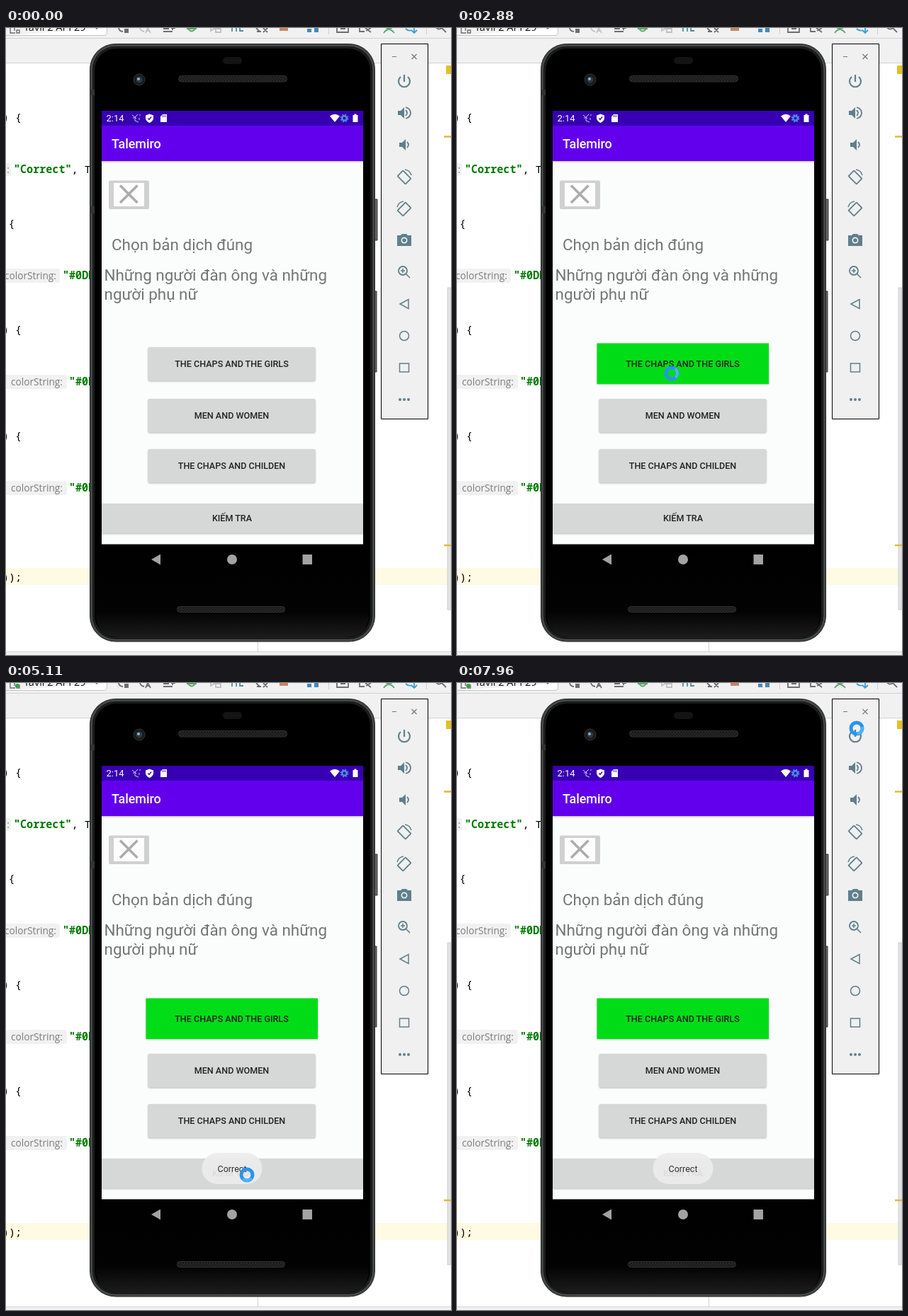
Recreate the animation shown at these times as an HTML page. Size 628x886 px, loop 8 s.

```html
<!DOCTYPE html>
<html lang="en">
<head>
<meta charset="utf-8">
<style>
html, body { margin: 0; width: 100%; height: 100%; overflow: hidden; background: #fff; }
svg { display: block; width: 628px; height: 886px; }
text { white-space: pre; }
.code { font: 15.1px "Noto Sans Mono", "DejaVu Sans Mono", monospace; }
.str { font-weight: 700; fill: #007a00; }
.hint { font: 13.7px "Open Sans", "Noto Sans", sans-serif; fill: #7d7d7d; text-anchor: end; }
.app { font-family: Roboto, sans-serif; }
.big { font-size: 22.44px; fill: #757575; }
.label { font-size: 12.57px; font-weight: 500; fill: #222; text-anchor: middle; }
.btn { fill: #d6d7d7; filter: drop-shadow(0 1px 1px #0004); }
.line { fill: none; stroke: #5f7f8c; stroke-width: 1.8; }
.solid { fill: #5f7f8c; stroke: none; }
</style>
</head>
<body>
<svg viewBox="0 0 628 886">
  <defs>
    <linearGradient id="chin" x2="0" y2="1">
      <stop offset="0" stop-color="#000"/><stop offset=".7" stop-color="#030303"/><stop offset="1" stop-color="#1c1c1c"/>
    </linearGradient>
    <linearGradient id="drop" x2="0" y2="1">
      <stop offset="0" stop-color="#000" stop-opacity=".2"/><stop offset="1" stop-color="#000" stop-opacity="0"/>
    </linearGradient>
    <pattern id="mesh" width="4" height="4" patternUnits="userSpaceOnUse">
      <path d="M0 4L4 0M0 0L4 4" stroke="#2c2c2c" stroke-width=".8"/>
    </pattern>
    <clipPath id="checkClip"><rect x="135" y="672" width="369" height="42"/></clipPath>
    <clipPath id="firstClip"><rect x="200.500" y="451" width="236" height="47.500" rx="2"/></clipPath>
    <clipPath id="screenClip"><rect x="135" y="117" width="369" height="612.500"/></clipPath>
  </defs>

  <!-- editor window -->
  <path d="M0 0H628V49H0zM0 882H628V886H0z" fill="#f1f1f1"/>
  <path d="M0 14.5H628M0 49.5H628M0 881.5H628M355.5 867V881" stroke="#d2d2d2"/>
  <path d="M0 763H628V787H0z" fill="#fffae3"/>
  <path d="M623 367H628V822H623z" fill="#e2e2e2" stroke="#cfcfcf"/>
  <path d="M621 53H628V65H621z" fill="#e5bf26"/>
  <path d="M618 153.5H628M618 731H628" stroke="#e3b93a" stroke-width="2.5"/>

  <g id="toolbar" fill="none" stroke="#6e6e6e" stroke-width="1.8">
    <path d="M0 10.5H138Q142.500 10.500 142.500 6V0" fill="#fff" stroke="#c4c4c4" stroke-width="1"/>
    <path d="M6 0V7H13M12 0V4M15 3H19V7H15z" stroke-width="1.4"/>
    <text x="25" y="4" font-family="Open Sans, sans-serif" font-size="14.5" fill="#111" stroke="none">Tavil 2 API 29</text>
    <path d="M125 -2L128 1L131 -2" stroke-width="1.4"/>
    <path d="M159 0Q160 5 165 5"/>
    <path d="M167 1H173V7H167z" fill="#6e6e6e" stroke="none"/>
    <path id="apply" d="M189 0Q190 4 195 5M197 7L200 0L204 7M198 4H203" stroke="#c3c3c3"/>
    <path d="M222 1H230M222 5H235M233 0H239M235 -2V3"/>
    <path d="M255 1H269M257 -2V1Q262 8 267 1V-2" stroke="#59a869"/>
    <path d="M289 -2V4L295 0M296 1H303V6H296z" stroke="#c0c0c0"/>
    <path d="M319 0V5M325 -2V5M330 -1V4H335" stroke="#4f8f9f"/>
    <path d="M353 0L358 5M363 0L369 6M369 0L363 6M354 5H360"/>
    <path d="M386 -2H398V4H386z" fill="#c98560" stroke="none"/>
    <path d="M425 1H431V6H425zM435 0H441V6H435z" fill="#4588b8" stroke="none"/>
    <path d="M455.500 0V9M593.500 0V9" stroke="#cfcfcf" stroke-width="1"/>
    <path d="M467 -2V6H483V-2M472 1H479"/>
    <path d="M499 0V5H506M507 0L515 6M515 0L508 4"/>
    <path d="M533 7Q540 -3 548 7M536 0H545" stroke="#59a869"/>
    <path d="M564 1Q568 5 573 3M576 -1V6M572 3L576 7L580 3" stroke="#389fd6"/>
    <path d="M606 -2Q610 4 615 0L621 6"/>
    <circle id="live" cx="16" cy="4" r="3" fill="#36a347" stroke="none"/>
  </g>

  <g class="code">
    <text x="-5" y="130.500">) {</text>
    <text x="3.500" y="280.500">{</text>
    <text x="-5" y="430.500">) {</text>
    <text x="-5" y="580.500">) {</text>
    <text x="-5" y="780.500">));</text>
    <text x="11" y="205"><tspan class="str">"Correct"</tspan>, T</text>
    <text class="str" x="80" y="355">"#0DD</text>
    <text class="str" x="89" y="505">"#0DD</text>
    <text class="str" x="89" y="655">"#0DD</text>
  </g>
  <path d="M0 191H3Q7 191 7 195V205Q7 209 3 209H0zM0 340H72Q76 340 76 344V356Q76 360 72 360H0zM0 490H82Q86 490 86 494V506Q86 510 82 510H0zM0 640H82Q86 640 86 644V656Q86 660 82 660H0z" fill="#f1f1f1"/>
  <g class="hint">
    <text x="5" y="205">:</text>
    <text x="71" y="355">colorString:</text>
    <text x="80" y="505">colorString:</text>
    <text x="80" y="655">colorString:</text>
  </g>

  <!-- phone body -->
  <path d="M517 242H524V300H517zM517 372H523V486H517z" fill="#6a6a6a" stroke="#333"/>
  <rect x="118.500" y="22.500" width="402" height="844.500" rx="36" fill="#3e4041" stroke="#2a2b2b"/>
  <rect x="121" y="25" width="397" height="839.500" rx="34" fill="#1b1c1c" stroke="#5a5c5c"/>
  <rect x="125" y="29" width="389" height="832" rx="31" fill="#000"/>
  <path d="M127 740H512V828Q512 861 479 861H160Q127 861 127 828z" fill="url(#chin)"/>
  <path d="M118 87H125V95H118zM118 252H125V262H118z" fill="#333"/>
  <rect x="306" y="41" width="27" height="10" rx="5" fill="#141414"/>
  <g fill="#1a1a1a" stroke="#333">
    <circle cx="188" cy="73" r="8"/>
    <rect x="243.500" y="67.500" width="153" height="8.500" rx="4"/>
    <rect x="241.500" y="817.500" width="152" height="8" rx="4"/>
  </g>
  <rect x="245" y="69" width="150" height="6" fill="url(#mesh)"/>
  <rect x="243" y="819" width="149" height="5" fill="url(#mesh)"/>
  <circle cx="188" cy="73" r="4.500" fill="#28394a"/>
  <circle cx="187" cy="72" r="2" fill="#8fb2c9"/>
  <g fill="#a3a3a3">
    <path d="M205 751L218 743.500V758.500z"/>
    <circle cx="319" cy="751" r="7"/>
    <path d="M418.500 744H432V758H418.500z"/>
  </g>

  <!-- app screen -->
  <g class="app" clip-path="url(#screenClip)">
    <path d="M135 117H504V730H135z" fill="#fbfdfd"/>
    <path d="M135 117H504V138H135z" fill="#3700b3"/>
    <path d="M135 138H504V188H135z" fill="#6200ee"/>
    <path d="M135 188H504V191H135z" fill="url(#drop)"/>
    <g fill="#fff">
      <text x="141.500" y="132" font-size="13">2:14</text>
      <path d="M178 123L184 128M186 122L182 126V131L187 133M188 127V130M179 127H181M189 122V124" fill="none" stroke="#d5c8f2" stroke-width="1"/>
      <path d="M197 123.500L202.500 121.500L208 123.500V128Q207 132 202.500 134Q198 132 197 128z"/>
      <path d="M200.500 127.500L202 129.500L205 125.500" fill="none" stroke="#3700b3" stroke-width="1.300"/>
      <path d="M221 122H227V133H218V125z"/>
      <path d="M221 123V126M223 123V126M225 123V126" stroke="#3700b3" stroke-width=".8"/>
      <path d="M457 124.500Q464 119 471 124.500L464 133z"/>
      <path d="M489.500 123H491.500V121.500H494.500V123H496.500V133H489.500z"/>
      <text x="149" y="170" font-size="17.96" font-weight="500">Talemiro</text>
    </g>
    <circle cx="477.500" cy="127.500" r="3.200" fill="none" stroke="#4b8fe2" stroke-width="2.400"/>
    <circle cx="477.500" cy="127.500" r="5" fill="none" stroke="#4b8fe2" stroke-width="1.600" stroke-dasharray="2.2 1.727"/>

    <rect x="145" y="215.500" width="57" height="40.500" rx="2" fill="#d0d0d0"/>
    <path d="M152 219H195V252H152z" fill="#fdfdfd"/>
    <path d="M161 222.500L185.500 247M185.500 222.500L161 247" stroke="#acacac" stroke-width="3.600"/>

    <g class="big">
      <text x="149" y="314">Chọn bản dịch đúng</text>
      <text x="138.500" y="357">Những người đàn ông và những</text>
      <text x="138.500" y="383.500">người phụ nữ</text>
    </g>

    <rect id="first" class="btn"/>
    <circle id="firstRipple" cy="488" cx="303" fill="#000" clip-path="url(#firstClip)"/>
    <rect class="btn" x="200.500" y="524" width="236" height="47.500" rx="2"/>
    <rect class="btn" x="200.500" y="595" width="236" height="47.500" rx="2"/>
    <rect id="check" class="btn" x="135" y="672" width="369" height="42"/>
    <circle id="checkRipple" cy="695" fill="#000" clip-path="url(#checkClip)"/>
    <g class="label">
      <text x="318.500" y="479">THE CHAPS AND THE GIRLS</text>
      <text x="318.500" y="552">MEN AND WOMEN</text>
      <text x="318.500" y="623">THE CHAPS AND CHILDEN</text>
      <text x="319" y="697">KIẾM TRA</text>
    </g>
    <g id="toast">
      <rect x="276.500" y="664" width="85" height="44" rx="22" fill="#ececec" opacity=".92"/>
      <text x="319" y="691" font-size="12.57" fill="#333" text-anchor="middle">Correct</text>
    </g>
  </g>

  <!-- side controls -->
  <path d="M529.500 22.500H595.500V552.500H529.500z" fill="#f0f0f0" stroke="#000"/>
  <path d="M545 40.500H551M572.500 37L579.500 44M579.500 37L572.500 44" stroke="#777" stroke-width="1.200"/>
  <g class="line">
    <g transform="translate(562 75)"><path d="M-5 -6A8 8 0 1 0 5 -6M0 -9V1" stroke-width="2.200"/></g>
    <g transform="translate(562 120)"><path class="solid" d="M-9 -3H-5L0 -8V8L-5 3H-9z"/><path d="M2 -4Q6 0 2 4M2 -8Q9 -6 9 0Q9 6 2 8"/></g>
    <g transform="translate(562 165)"><path class="solid" d="M-7 -3H-3L2 -8V8L-3 3H-7z"/><path d="M4 -4Q8 0 4 4"/></g>
    <g id="rotate" transform="translate(562 210)">
      <rect x="-5.500" y="-8" width="11" height="16" rx="1" transform="translate(0 1) rotate(-45)"/>
      <path d="M1 -10Q8 -9 10 -2" stroke-width="1.500"/>
    </g>
    <use href="#rotate" transform="translate(1124 45) scale(-1 1)"/>
    <g transform="translate(562 300)"><path class="solid" d="M-10 -7H-5L-3 -9H3L5 -7H10V8H-10z"/><circle r="4.500" fill="#f0f0f0" stroke="none"/><circle r="2.800" class="solid"/></g>
    <g transform="translate(560 343)"><circle r="6"/><path d="M4 4L10 10M-3 0H3M0 -3V3" stroke-width="1.600"/></g>
    <path d="M556 390L568 383.500V396.500z" stroke-width="1.500"/>
    <circle cx="562" cy="435" r="6.500" stroke-width="1.500"/>
    <path d="M555.500 474H568.500V486H555.500z" stroke-width="1.500"/>
    <path d="M556 525H569" stroke-width="4" stroke-linecap="round" stroke-dasharray="0 6"/>
  </g>

  <g id="cursor" fill="none">
    <circle r="8" stroke="#2993ee" stroke-width="5"/>
    <circle id="glint" r="8" stroke="#4fb4f6" stroke-width="4" stroke-dasharray="14 36.27"/>
  </g>
</svg>
<script>
const LOOP = 8000, STEP = 77.4;
const $ = id => document.getElementById(id);
const set = (id, attrs) => {
  for (const k in attrs) $(id).setAttribute(k, attrs[k]);
};
const ramp = (t, a, b) => Math.min(1, Math.max(0, (t - a) / (b - a)));

// time, x, y of the pointer
const path = [
  [530, 553, 719], [608, 460, 570], [690, 405, 522], [1000, 350, 493], [1310, 334, 488],
  [1540, 334, 488], [2080, 310, 488], [2320, 303, 488], [3040, 303, 488], [3420, 330, 610],
  [3700, 352, 692], [3800, 352, 696], [4100, 340, 695], [5570, 340, 695], [6340, 356, 695],
  [7270, 356, 695], [7500, 475, 478], [7680, 482, 242], [7950, 564, 64]
];

function pointer(t) {
  const i = path.findIndex(p => p[0] > t);
  if (i < 0) return path.at(-1).slice(1);
  const a = path[Math.max(0, i - 1)], b = path[i];
  const k = ramp(t, a[0], b[0]);
  return [a[1] + (b[1] - a[1]) * k, a[2] + (b[2] - a[2]) * k];
}

// dark circle that grows from the press point, then fades
const ripple = (t, start, end) => ({
  r: 380 * ramp(t, start, start + 310),
  opacity: t < start ? 0 : .115 * (1 - ramp(t, end, end + 270))
});

function draw(now) {
  const time = now % LOOP;
  const t = time < 520 ? 0 : 530 + Math.floor((time - 520) / STEP) * STEP;
  const [x, y] = pointer(t);
  set("cursor", { transform: `translate(${x} ${y})`, visibility: t ? "visible" : "hidden" });
  set("glint", { transform: `rotate(${t * .36})` });

  const chosen = t >= 2700;
  set("first", chosen
    ? { x: 197.5, y: 445.5, width: 242.5, height: 57.5, rx: 0, style: "fill:#00dd16" }
    : { x: 200.5, y: 451, width: 236, height: 47.5, rx: 2, style: "" });
  set("firstRipple", chosen ? { opacity: 0 } : ripple(t, 2460, 2800));

  const second = t > 6000;
  set("checkRipple", { cx: second ? 356 : 340, ...(second ? ripple(t, 6400, 6860) : ripple(t, 4220, 4740)) });
  const pressed = t > 4220 && t < 4740 || t > 6400 && t < 6860;
  set("check", { style: pressed ? "filter:drop-shadow(0 1px 2px #0005)" : "" });
  set("toast", { opacity: ramp(t, 4480, 4640) });

  const running = t >= 3870;
  set("live", { opacity: +running });
  set("apply", { stroke: running ? "#6e6e6e" : "#c3c3c3" });
  requestAnimationFrame(draw);
}
requestAnimationFrame(draw);
</script>
</body>
</html>
```
